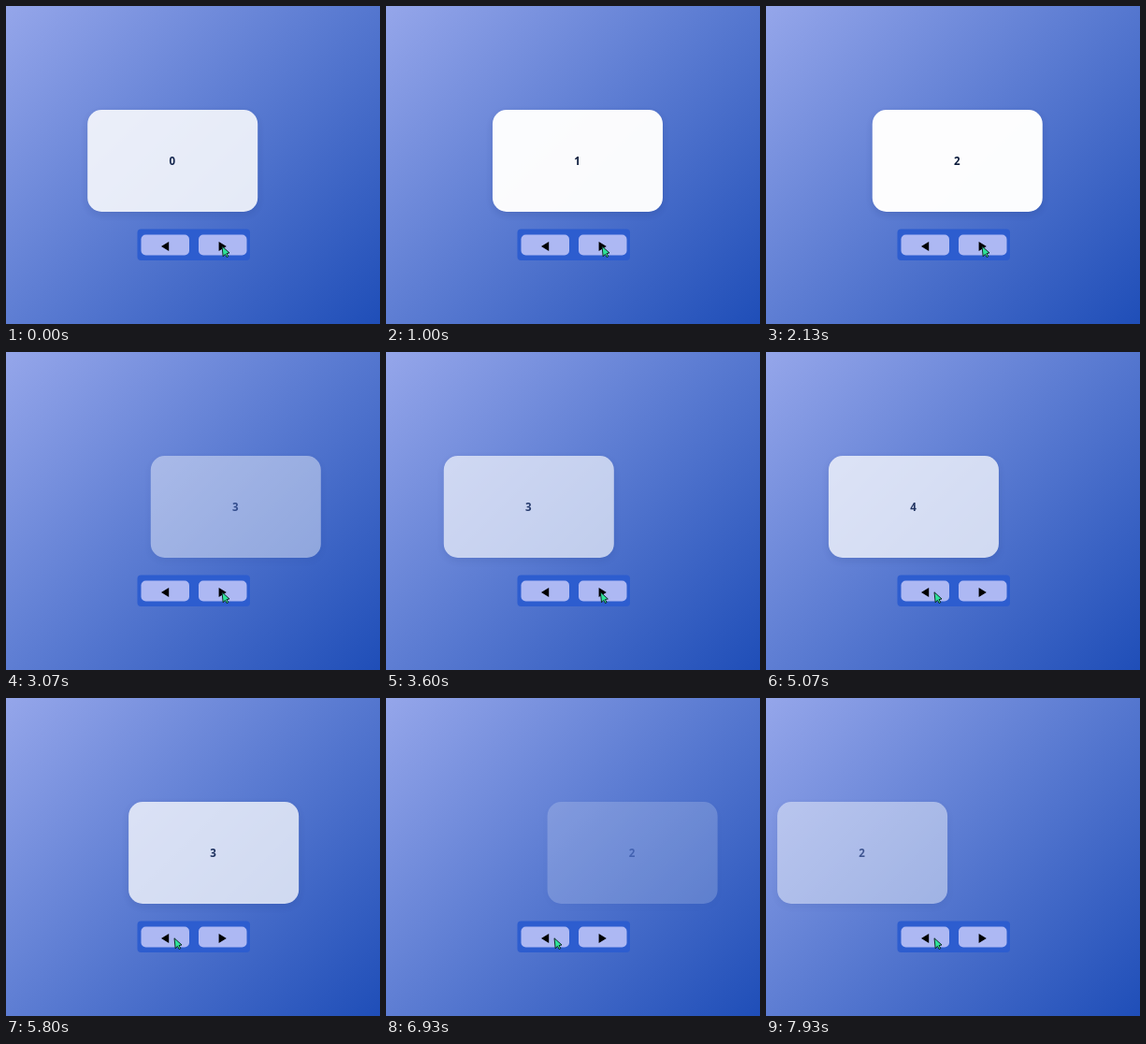
These frames come from a looping animation (400x340 px, 8000 ms). An HTML page:

```html
<!DOCTYPE html>
<html lang="en">
<head>
<meta charset="utf-8">
<title>Card slider</title>
<style>
  html, body { margin: 0; width: 100%; height: 100%; overflow: hidden; }
  #stage {
    position: relative; width: 400px; height: 340px; overflow: hidden;
    background: linear-gradient(135deg, #95a6ea, #597ad1 50%, #1f4eb8);
  }
  #card {
    position: absolute; left: 112.5px; top: 110.5px; width: 182px; height: 109px;
    border-radius: 15px; background: #fff; color: #0b1a3a;
    box-shadow: 0 3px 8px rgba(10, 30, 90, .16);
    font: 700 11.5px/110px "Noto Sans", "Open Sans", sans-serif; text-align: center;
  }
  svg { position: absolute; left: 0; top: 0; }
</style>
</head>
<body>
<div id="stage">
  <div id="card"></div>
  <svg width="400" height="340">
    <rect x="140.5" y="238.5" width="120.5" height="33.5" rx="4" fill="#2d5dcf"/>
    <g fill="#adb8f3">
      <rect x="144.5" y="244.5" width="51.5" height="22" rx="5"/>
      <rect x="206" y="244.5" width="51.5" height="22" rx="5"/>
    </g>
    <path d="M166 257l8.2-5v10zM235.8 257l-8.2-5v10z" fill="#000"/>
    <path id="cursor" d="M0 0L1.2 11L3.4 8.6L5.2 11.8L6.8 10.8L5 7.8L8 7.2Z"
      fill="#2fe39a" stroke="#0a1a1a" stroke-width=".9" stroke-linejoin="round"/>
  </svg>
</div>
<script>
const LOOP = 8000, PHASE = 600;      // each swap: leave, then arrive
const ENTER_X = 73, EXIT_X = -182;
const swaps = [                      // click time and the number it brings in
  [-156, 1], [977, 2], [2299, 3], [3373, 4], [4862, 3], [6262, 2], [7612, 1]
];
const card = document.getElementById('card');
const cursor = document.getElementById('cursor');
const clamp = v => Math.min(1, Math.max(0, v));
const mix = (a, b, k) => a + (b - a) * k;

// Bezier easing with control points (x1, 0) and (x2, 1).
function bezier(x1, x2) {
  return p => {
    if (p <= 0 || p >= 1) return clamp(p);
    let low = 0, high = 1, s;
    for (let i = 0; i < 24; i++) {
      s = (low + high) / 2;
      const x = 3 * (1 - s) ** 2 * s * x1 + 3 * (1 - s) * s * s * x2 + s ** 3;
      if (x < p) low = s; else high = s;
    }
    return 3 * (1 - s) * s * s + s ** 3;
  };
}
const easeOut = bezier(0, .58), easeInOut = bezier(.42, .58);

const arrival = (click, t) => easeOut(clamp((t - click - PHASE) / PHASE));

function pose(t) {
  const i = swaps.findLastIndex(([click]) => click <= t);
  const [click, value] = swaps[i];
  if (t < click + PHASE) {
    const [lastClick, lastValue] = swaps[i - 1] || [-LOOP, 0];
    const from = arrival(lastClick, click);
    const k = easeInOut((t - click) / PHASE);
    return { value: lastValue, x: mix(ENTER_X * (1 - from), EXIT_X, k), opacity: from * (1 - k) };
  }
  const k = arrival(click, t);
  return { value, x: ENTER_X * (1 - k), opacity: k };
}

function render(t) {
  const { value, x, opacity } = pose(t);
  card.textContent = value;
  card.style.transform = `translateX(${x}px)`;
  card.style.opacity = opacity;
  const k = easeInOut(clamp((t - 3550) / 400));
  cursor.setAttribute('transform', `translate(${mix(231, 180, k)} 256.8)`);
}

const start = performance.now();
function tick() {
  render((performance.now() - start) % LOOP);
  requestAnimationFrame(tick);
}
tick();
</script>
</body>
</html>
```
